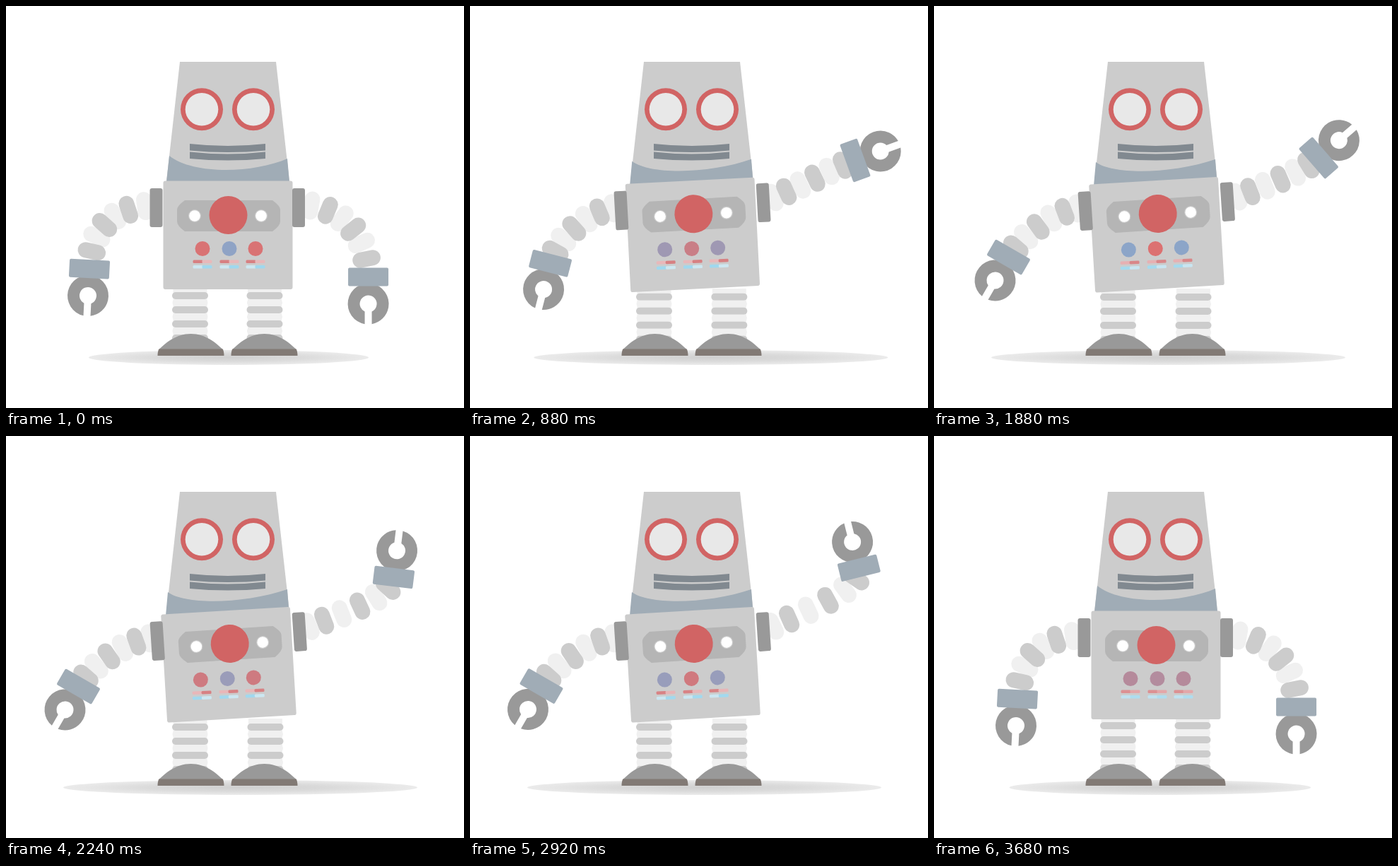
Write an HTML page with a canvas that moves like this. It is 648x569 px and loops after 3.72 s.

```html
<!DOCTYPE html>
<html>
<head>
<meta charset="utf-8">
<title>Waving robot</title>
<style>
html, body { margin: 0; height: 100%; overflow: hidden; background: #fff; }
canvas { display: block; }
</style>
</head>
<body>
<canvas id="stage" width="648" height="569"></canvas>
<script>
const ctx = document.getElementById('stage').getContext('2d');
const LOOP = 3720, STEP = 40, RAD = Math.PI / 180;
const GREY = '#cccccc', PALE = '#f0f0f0', STEEL = '#a0acb6', DARK = '#999999', RED = '#d16464';

const mix = (a, b, k) => a + (b - a) * k;
const cycle = (t, peak, period) => Math.cos((t - peak) / period * 2 * Math.PI);

function ramp(t, from, to) {
  const u = Math.min(1, Math.max(0, (t - from) / (to - from)));
  return u * u * (3 - 2 * u);
}

// Rises during one interval and falls during a later one
const hold = (t, up, upEnd, down, downEnd) => ramp(t, up, upEnd) * (1 - ramp(t, down, downEnd));

function overshoot(u, k = 2.6) {
  return 1 + (k + 1) * (u - 1) ** 3 + k * (u - 1) ** 2;
}

function mixColor(a, b, k) {
  return `rgb(${a.map((v, i) => Math.round(mix(v, b[i], k)))})`;
}

function placed(x, y, angle, draw) {
  ctx.save();
  ctx.translate(x, y);
  ctx.rotate(angle * RAD);
  draw();
  ctx.restore();
}

function shape(color, path) {
  ctx.fillStyle = color;
  ctx.fill(new Path2D(path));
}

function box(color, x, y, w, h, r = 0) {
  ctx.fillStyle = color;
  ctx.beginPath();
  ctx.roundRect(x, y, w, h, r);
  ctx.fill();
}

function disc(color, x, y, r, ry = r) {
  ctx.fillStyle = color;
  ctx.beginPath();
  ctx.ellipse(x, y, r, ry, 0, 0, 7);
  ctx.fill();
}

function shadow(left, right) {
  placed((left + right) / 2, 497.5, 0, () => {
    ctx.scale((right - left) / 2, 10.5);
    const fade = ctx.createRadialGradient(0, 0, 0, 0, 0, 1);
    fade.addColorStop(0, '#d0d0d0');
    fade.addColorStop(.5, '#dadada');
    fade.addColorStop(1, '#ebebeb');
    disc(fade, 0, 0, 1);
  });
}

function leg(x, lean) {
  box(PALE, x - 24, 400, 48, 72);
  for (let i = 0; i < 7; i++) {
    const y = 405 + i * 10 + lean * 2;
    if (i % 2) box(PALE, x - 25, y, 50, 10, 5);
    else box(GREY, x - 25.5, y, 51, 10, 5);
  }
}

function foot(x) {
  shape(DARK, `M${x - 46} 487C${x - 36} 477 ${x - 21} 464 ${x} 464S${x + 36} 477 ${x + 46} 487Z`);
  shape('#827a75', `M${x - 45} 485.5h90q2 3 2 9.5h-94q0 -6.5 2 -9.5Z`);
}

function claw() {
  const outer = Math.asin(5 / 29), inner = Math.asin(5 / 12);
  ctx.fillStyle = DARK;
  ctx.beginPath();
  ctx.arc(0, 0, 29, outer, -outer);
  ctx.arc(0, 0, 12, -inner, inner, true);
  ctx.fill();
  box(STEEL, -51, -28.5, 26, 57, 2);
}

// Ribbed hose from the shoulder to the cuff, then the claw; side is 1 or -1
function arm(sx, sy, hx, hy, angle, side, handle) {
  const dx = Math.cos(angle * RAD), dy = Math.sin(angle * RAD);
  const ex = hx - 38 * dx, ey = hy - 38 * dy;
  const reach = Math.atan2(hy - sy, (hx - sx) * side) / RAD;
  const start = (.33 * reach - 14) * RAD;
  const xs = [sx, sx + handle * side * Math.cos(start), ex - handle * dx, ex];
  const ys = [sy, sy + handle * Math.sin(start), ey - handle * dy, ey];
  const point = (p, u) => (1 - u) ** 3 * p[0] + 3 * u * (1 - u) ** 2 * p[1]
    + 3 * u * u * (1 - u) * p[2] + u ** 3 * p[3];
  for (const odd of [0, 1]) {
    for (let i = odd; i < 6; i += 2) {
      const u = .07 + i * .155;
      const tilt = Math.atan2(point(ys, u + .01) - point(ys, u - .01),
        point(xs, u + .01) - point(xs, u - .01)) / RAD;
      placed(point(xs, u), point(ys, u), tilt,
        () => box(odd ? GREY : PALE, -11, -20, 22, 40, 11));
    }
  }
  placed(hx, hy, angle, claw);
}

function head(lean, open) {
  shape(GREY, 'M246 79H382L401 248H227Z');
  const m = (a, b) => mix(a, b, lean);
  shape(STEEL, `M${m(231, 229)} ${m(212, 221)}C${m(265, 255)} ${m(239, 240)} ${m(350, 340)} 237 398 ${m(216, 217)}
    L${m(401, 400)} ${m(249, 244)}L${m(227, 226)} ${m(249, 254)}Z`);
  for (const x of [277, 350]) {
    disc(RED, x, 146.3, 30, 30 * open);
    disc('#e8e8e8', x, 146.3, 23.3, 23.3 * open);
  }
  for (const y of [195, 206.5]) {
    shape('#818990', `M260 ${y}Q314 ${y + 6} 367 ${y}v9.5Q314 ${y + 14.5} 260 ${y + 9.5}Z`);
  }
}

function torso(lean, t) {
  placed(314 + lean, 324 - lean / 2, -3.4 * lean, () => box(GREY, -91.5, -76.5, 183, 153.5, 3));
  placed(314 + 2.2 * lean, 296 - 2 * lean, -3.7 * lean, () => {
    box(DARK, -110.5, -38, 18, 55, 3);
    box(DARK, 91, -38, 18, 55, 3);
    shape('#b5b5b5', 'M-61 -21H63Q74 -13 74 -8V9Q74 15 63 23H-61Q-72 15 -72 9V-8Q-72 -13 -61 -21Z');
    for (const x of [-47, 47]) {
      disc(GREY, x, 1, 9);
      disc('#ffffff', x, 1, 7.8);
    }
    disc(RED, .5, 0, 27);
  });
  const red = [220, 113, 113], blue = [140, 165, 200];
  const swap = (1 + cycle(t, 1340, 550)) / 2, flick = (1 - cycle(t, 0, 195.6)) / 2;
  placed(315.5 - 2.7 * lean, 343.5, -2.3 * lean, () => {
    [-37.5, .5, 37.5].forEach((x, i) => {
      disc(mixColor(red, blue, i === 1 ? 1 - swap : swap), x, 0, 10.5);
      const bar = x - 13.5 + lean;
      const pair = (y, a, b) => {
        box(mixColor(a, b, flick), bar, y, 14, 4.5, 1.5);
        box(mixColor(b, a, flick), bar + 13, y, 14, 4.5, 1.5);
      };
      pair(16, [215, 128, 130], [232, 184, 186]);
      pair(23.5, [205, 231, 241], [160, 216, 238]);
    });
  });
}

function blink(t) {
  const near = Math.min(Math.abs(t - 300), Math.abs(t - 2440));
  return mix(.08, 1, ramp(near, 0, 120));
}

function render(t) {
  ctx.fillStyle = '#fff';
  ctx.fillRect(0, 0, 648, 569);

  // The raise plays backwards at the end, so measure from the nearer end
  const since = Math.min(t, 4160 - t) - 560;
  const lift = overshoot(ramp(since, 0, 320));
  const lean = hold(t, 560, 980, 3280, 3640);
  const spread = hold(t, 700, 1100, 3260, 3640);
  const grow = hold(t, 560, 1040, 3320, 3880);
  const sway = cycle(t, 880, 240);
  const swing = mix(59, -35.5 + 11.5 * sway, lift) * RAD;
  const rightHand = mix(90, -62 + 42 * sway, lift);
  const handle = mix(58, 34, lean);

  shadow(mix(117, 81, grow), mix(513, 582, grow) + 28 * Math.exp(-(((since - 300) / 120) ** 2)));
  leg(260.5, lean);
  leg(366 + lean, lean);
  foot(261.5);
  foot(365.5);
  arm(208 + 2 * lean, 282 + 4 * lean,
    mix(116, 85 + 3 * sway, spread), mix(410, 388 + sway, spread), mix(93, 120, spread), -1, handle);
  arm(420 + 2 * lean, 281 - 8 * lean,
    424.5 + 171 * Math.cos(swing), 275 + 171 * Math.sin(swing), rightHand, 1, handle);
  head(lean, blink(t));
  torso(lean, t);
}

const begin = performance.now();
function tick() {
  const t = (performance.now() - begin) % LOOP;
  render(Math.floor(t / STEP) * STEP);
  requestAnimationFrame(tick);
}
tick();
</script>
</body>
</html>
```
